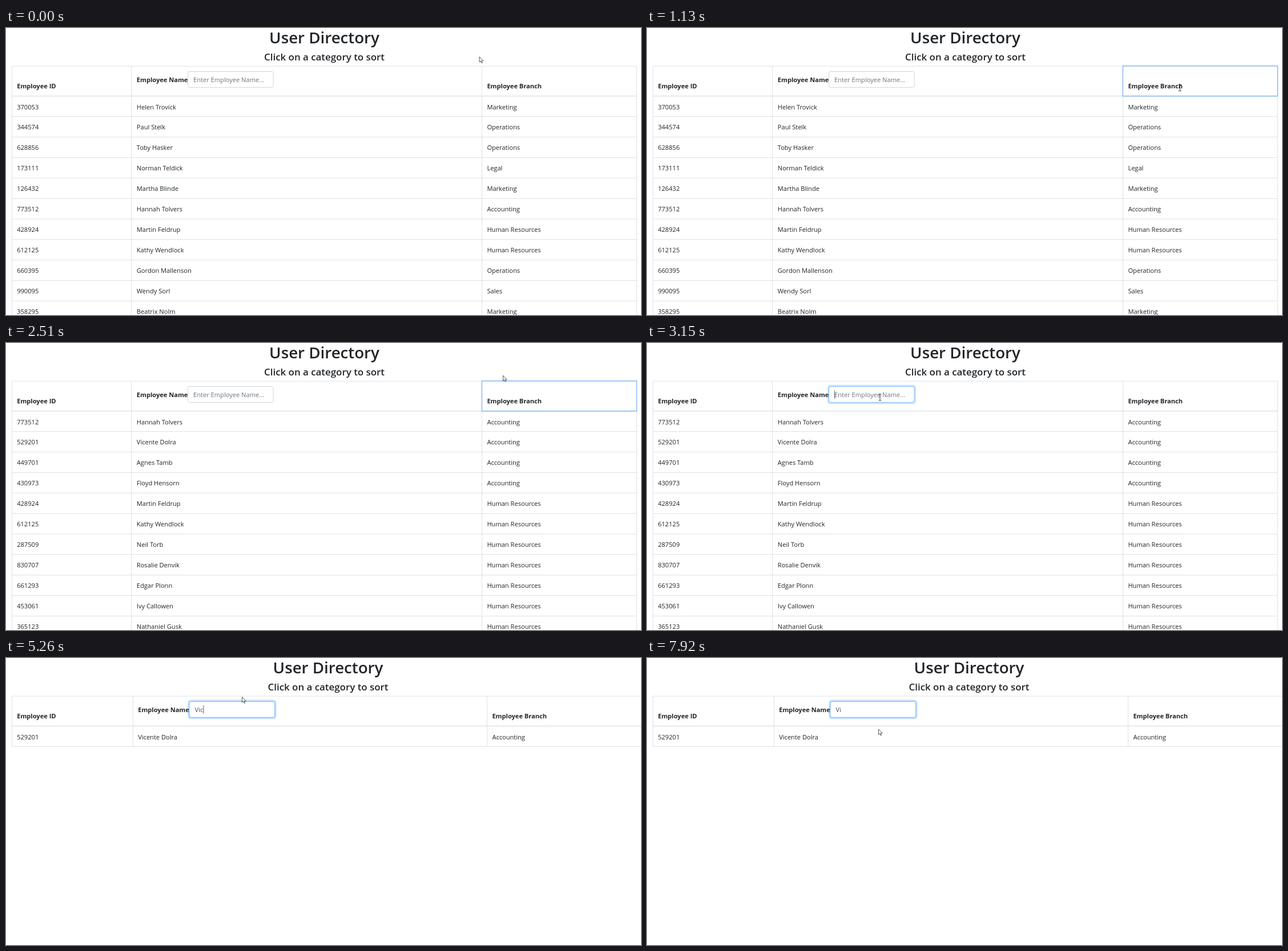
An HTML page that plays this animation: 1112 by 504 pixels, repeating every 8000 ms.

```html
<!DOCTYPE html>
<html lang="en">
<head>
<meta charset="utf-8">
<title>User Directory</title>
<style>
html, body { margin: 0; width: 100%; height: 100%; overflow: hidden; background: #fff; }
svg { display: block; width: 100vw; height: 100vh; }
text { font: 11.1px "Open Sans", "Noto Sans", sans-serif; fill: #212529; white-space: pre; }
.th { font-weight: 700; }
.h1 { font-size: 27.7px; font-weight: 600; text-anchor: middle; }
.h4 { font-size: 16.9px; font-weight: 600; text-anchor: middle; }
.line { stroke: #dee2e6; fill: none; }
</style>
</head>
<body>
<svg id="stage" viewBox="0 0 1112 504"></svg>
<script>
const LOOP = 8000;
const stage = document.getElementById("stage");

const staff = `370053|Helen Trovick|Marketing
344574|Paul Stelk|Operations
628856|Toby Hasker|Operations
173111|Norman Teldick|Legal
126432|Martha Blinde|Marketing
773512|Hannah Tolvers|Accounting
428924|Martin Feldrup|Human Resources
612125|Kathy Wendlock|Human Resources
660395|Gordon Mallenson|Operations
990095|Wendy Sorl|Sales
358295|Beatrix Nolm|Marketing
770698|Nellie Hadrick|Sales
164058|Fanny Grolder|Operations
110553|Theodore Lunnis|Operations
269642|Tina Molvards|Marketing
529201|Vicente Dolra|Accounting
449701|Agnes Tamb|Accounting
430973|Floyd Hensorn|Accounting
287509|Neil Torb|Human Resources
830707|Rosalie Denvik|Human Resources
661293|Edgar Plonn|Human Resources
453061|Ivy Callowen|Human Resources
365123|Nathaniel Gusk|Human Resources`.split("\n").map(row => row.split("|"));

const byBranch = dir => [...staff].sort((a, b) => dir * a[2].localeCompare(b[2]));
const narrow = { cols: [10.5, 219.5, 833.5, 1104.5], mid: 557.5, name: 228.8, field: 318.5 };
const wide = { cols: [10.5, 222.5, 842.5, 1120], mid: 564, name: 231.2, field: 321 };

function el(tag, attrs, parent = stage, content) {
  const node = document.createElementNS("http://www.w3.org/2000/svg", tag);
  for (const key in attrs) node.setAttribute(key, attrs[key]);
  if (content) node.textContent = content;
  parent.appendChild(node);
  return node;
}
const set = (node, attrs) => { for (const key in attrs) node.setAttribute(key, attrs[key]); };
const show = (node, on) => node.setAttribute("visibility", on ? "inherit" : "hidden");

function buildTable(layout, people) {
  const g = el("g", {});
  const { cols, mid, name } = layout;
  const label = (x, y, text, cls = "") => el("text", { x, y, class: cls }, g, text);
  const line = (d, width = 1) => el("path", { d, class: "line", "stroke-width": width }, g);
  const rows = people.slice(0, 11);
  const rowEnd = i => Math.round(155 + 35.95 * i) + 0.5;

  label(mid, 27.4, "User Directory", "h1");
  label(mid, 57, "Click on a category to sort", "h4");
  for (const x of cols) line(`M${x} 67V${Math.min(504, rowEnd(rows.length - 1))}`);
  line(`M10 67H${cols[3] + 0.5}`);
  line(`M10 119.6H${cols[3] + 0.5}`, 1.5);

  const xs = [19.2, name, cols[2] + 8.9];
  label(xs[0], 106, "Employee ID", "th");
  label(xs[1], 94.9, "Employee Name", "th");
  label(xs[2], 106, "Employee Branch", "th");
  rows.forEach((row, i) => {
    row.forEach((cell, c) => label(xs[c], 142.5 + 35.93 * i, cell));
    line(`M10 ${rowEnd(i)}H${cols[3] + 0.5}`);
  });
  return g;
}

const views = [
  { from: 0, layout: narrow, people: staff },
  { from: 1200, layout: narrow, people: byBranch(-1) },
  { from: 1960, layout: narrow, people: byBranch(1) },
  { from: 5260, layout: wide, people: staff.filter(p => p[1].includes("Vic")) }
];
for (const view of views) view.node = buildTable(view.layout, view.people);

const headerRing = el("rect", { x: 833.3, y: 66.6, width: 271.2, height: 53, fill: "none", stroke: "#6ca5f3", "stroke-width": 1.1 });

// Search field
const field = el("g", {});
const glow = el("rect", { x: -1.3, y: 74.9, width: 152.4, height: 31, rx: 4, fill: "none", stroke: "#007bff", "stroke-opacity": 0.25, "stroke-width": 2.6 }, field);
el("rect", { x: 0, y: 76.5, width: 149.6, height: 27.8, rx: 2.8, fill: "#fff", stroke: "#ced4da" }, field);
const focusEdge = el("rect", { x: 0, y: 76.5, width: 149.6, height: 27.8, rx: 2.8, fill: "none", stroke: "#80bdff" }, field);
const hint = el("text", { x: 9.6, y: 94.9, style: "fill:#6c757d" }, field, "Enter Employee Name...");
const typed = el("text", { x: 9.6, y: 94.9, style: "fill:#495057" }, field);
const caret = el("rect", { y: 83, width: 0.9, height: 14.6, fill: "#495057" }, field);

// Pointers, hot spot at 0,0
const arrow = el("path", { d: "M.4 .4V9.9L2.6 7.9 4.1 11.4 5.6 10.8 4.1 7.4H7.1Z", fill: "#fff", stroke: "#222", "stroke-width": 0.75, "stroke-linejoin": "round" });
const beam = el("path", { d: "M-2.2 -5.6H-.5L0 -5.2 .5 -5.6H2.2M0 -5.2V5.2M-2.2 5.6H-.5L0 5.2 .5 5.6H2.2", fill: "none", stroke: "#222", "stroke-width": 0.9 });

// time, x, y
const path = [
  [0, 829, 50], [170, 765, 66], [310, 685, 100], [400, 661, 121], [490, 690, 140],
  [640, 815, 132], [760, 908, 112], [830, 933.4, 105], [1460, 933.4, 105], [1570, 958, 91],
  [1780, 958, 91], [1820, 959, 91], [1910, 959, 91], [1960, 960, 83], [2320, 960, 83],
  [2450, 925, 64], [2600, 790, 46], [2750, 600, 50], [2880, 465, 78], [2980, 408, 95.5],
  [3340, 408, 95.5], [3480, 409, 86], [3620, 413, 68], [7529, 413, 68], [7530, 405, 124.5], [LOOP, 405, 124.5]
];

function pointerAt(t) {
  const i = Math.max(1, path.findIndex(p => p[0] > t));
  const [t0, x0, y0] = path[i - 1], [t1, x1, y1] = path[i];
  const k = (t - t0) / (t1 - t0);
  return [x0 + (x1 - x0) * k, y0 + (y1 - y0) * k];
}

const within = (t, a, b) => t >= a && t < b;
const lastFrom = (list, t) => list.filter(s => s.from <= t).pop();
const entries = [
  { from: 0, text: "" }, { from: 4180, text: "V" }, { from: 4460, text: "Vi" },
  { from: 4740, text: "Vic" }, { from: 7920, text: "Vi" }
];
const caretOn = [[3080, 3620], [4130, 5800], [6310, 6870], [7380, 7820]];

function draw(t) {
  const view = lastFrom(views, t);
  for (const v of views) show(v.node, v === view);
  show(headerRing, within(t, 1130, 3040));

  set(field, { transform: `translate(${view.layout.field} 0)` });
  const focus = Math.min(1, Math.max(0, (t - 3040) / 130));
  set(glow, { opacity: focus });
  set(focusEdge, { opacity: focus });

  const { text } = lastFrom(entries, t);
  if (typed.textContent !== text) typed.textContent = text;
  show(hint, !text);
  set(caret, { x: 9.8 + (text ? typed.getComputedTextLength() : 0) });
  show(caret, caretOn.some(([a, b]) => within(t, a, b)));

  const [x, y] = pointerAt(t);
  const overText = within(t, 800, 1490) || within(t, 2880, 3560);
  for (const p of [arrow, beam]) set(p, { transform: `translate(${x} ${y})` });
  show(arrow, !overText);
  show(beam, overText);
}

const start = performance.now();
function tick() {
  draw((performance.now() - start) % LOOP);
  requestAnimationFrame(tick);
}
tick();
</script>
</body>
</html>
```
